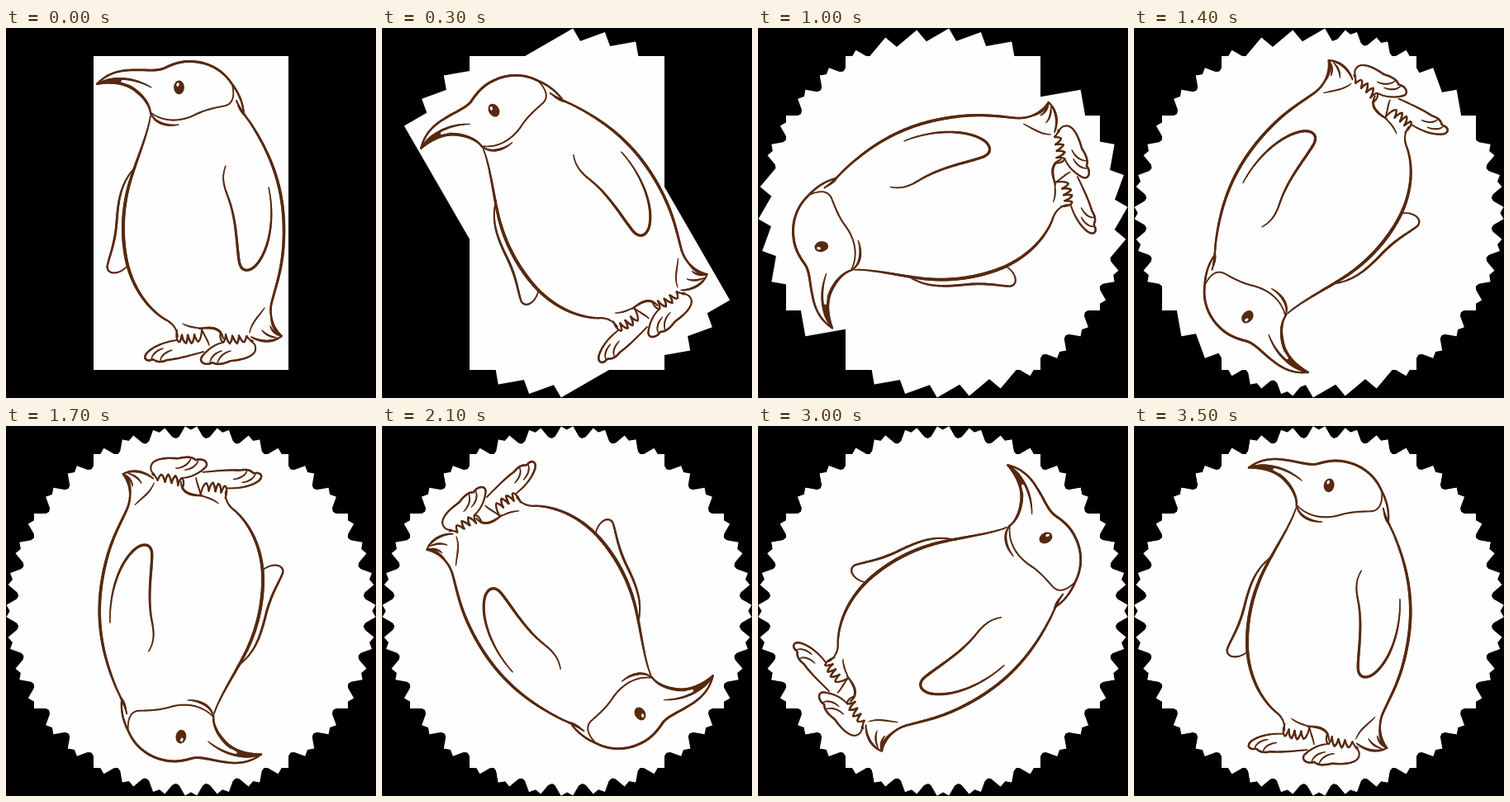
Write an HTML page with a canvas that moves like this. It is 448 px wide and 448 px high and loops after 3.6 s.

```html
<!DOCTYPE html>
<html lang="en">
<head>
<meta charset="utf-8">
<title>Turning penguin</title>
<style>
  html, body { margin: 0; width: 100%; height: 100%; overflow: hidden; background: #000; }
  canvas { display: block; }
</style>
</head>
<body>
<canvas width="448" height="448"></canvas>
<script>
const ctx = document.querySelector('canvas').getContext('2d');
const INK = '#57290f', PAPER = '#fefefe';
const STEP = 100, STEPS = 36, TURN = -Math.PI * 2 / STEPS;

// Each brush stroke: path, width at the ends, width in the middle
const strokes = [
  // beak, head and face
  ['M110 68C120 57 134 51 152 51C168 50 180 53 191 49C203 43 213 40 224 40.500C247 41 264 53 273 67C283 80 287 92 288 104', 2.2, 3],
  ['M110 68C130 64 146 67 157 76C167 84 174 92 175 104', 2, 3.4],
  ['M110 67C132 58 155 60 176 72', 1.3, 2.8],
  ['M274 69C277 82 275 91 266 94C251 97 241 99 229 105C211 114 191 114 176 103', 1.6, 2],
  ['M175 101C177 113 192 120 209 117', 1.2, 3],
  // body
  ['M175 106C172 127 160 155 152 180C142 210 139 244 145 277C151 311 170 339 193 353C203 358 207 365 208 374', 1.7, 4],
  ['M279 88C283 98 289 105 296 115C320 152 336.500 192 336.500 245C336.500 285 329 305 322 331C318 346 322 362 334 373', 2, 3.6],
  ['M281 93C284 99 287 104 290 106', 1.8, 3.2],
  // flippers
  ['M157 168C140 186 136 205 134 235C132 262 125 276 122.500 289C123 300 138 298 146 289', 1.6, 2.9],
  ['M266 167C261 180 263 190 269 205C279 232 279 260 282 281C284 297 295 295 302 288C319 270 326 230 318 193', 1.5, 3.2],
  // tail
  ['M334 373C324 381 309 381 297 374', 1.8, 3],
  ['M313 339C306 349 297 357 295 369', 1.2, 2],
  ['M320 361C322 367 327 371 333 373', 1.4, 2.6],
  ['M310 366C314 371 320 374 328 375', 1.2, 2.4],
  // belly and feathered legs
  ['M214 358C221 362 229 363 237 363.500', 1.2, 2],
  ['M234 364C248 362 260 362 263 376', 1.8, 3],
  ['M207 366Q205 377 210 381Q212 377 213 371Q214 379 218 382Q220 377 220 371Q222 379 225 382Q228 377 228 371Q230 378 233 380Q237 375 237 364', 2, 2.4],
  ['M237 364C239 371 244 377 246 384', 1.5, 2],
  ['M260 368Q258 377 263 381Q266 377 266 371Q268 380 271 382Q274 378 274 372Q277 380 280 382Q282 378 282 372Q285 379 288 381Q291 377 291 372Q294 378 299 379', 2, 2.4],
  // feet
  ['M207 378C191 380 178 386 171 393C164 401 172 405 178 401C183 405 188 405 195 402C207 401 225 396 239 392', 1.8, 2.5],
  ['M176 401C177 395 183 390 190 388', 1.3, 2],
  ['M187 403C187 397 194 392 201 390', 1.3, 2],
  ['M262 381C251 383 240 393 236 400C235 408 246 408 250 405C256 409 265 406 272 403C286 402 300 398 302 390C303 384 300 381 296 379', 1.8, 2.5],
  ['M247 405C248 398 254 393 261 391', 1.3, 2],
  ['M256 406C258 398 264 393 272 391', 1.3, 2]
];

const fills = [
  'M110 69C118 60 132 59 146 61C139 63 136 65 144 68C130 65 120 66 110 69Z',
  'M146 67C162 74 174 88 176 102C168 88 160 77 146 67Z',
  'M322 338C318 350 323 364 334 374C325 372 316 356 322 338Z'
].map(d => new Path2D(d));

// Sample a path into points that carry the brush width
function sample([d, thin, thick]) {
  const path = document.createElementNS('http://www.w3.org/2000/svg', 'path');
  path.setAttribute('d', d);
  const length = path.getTotalLength(), n = Math.ceil(length / 2.5);
  return Array.from({ length: n + 1 }, (_, i) => {
    const { x, y } = path.getPointAtLength(length * i / n);
    return { x, y, w: thin + (thick - thin) * Math.sin(Math.PI * i / n) };
  });
}
const brushed = strokes.map(sample);

function ellipse(x, y, rx, ry, tilt, color) {
  ctx.fillStyle = color;
  ctx.beginPath();
  ctx.ellipse(x, y, rx, ry, tilt, 0, Math.PI * 2);
  ctx.fill();
}

function penguin() {
  ctx.strokeStyle = ctx.fillStyle = INK;
  ctx.lineCap = 'round';
  for (const points of brushed) {
    for (let i = 1; i < points.length; i++) {
      const a = points[i - 1], b = points[i];
      ctx.lineWidth = (a.w + b.w) / 2;
      ctx.beginPath();
      ctx.moveTo(a.x, a.y);
      ctx.lineTo(b.x, b.y);
      ctx.stroke();
    }
  }
  fills.forEach(shape => ctx.fill(shape));
  ellipse(209.5, 72, 6.4, 8.4, 0, INK);
  ellipse(208, 68.5, 1.6, 2.4, 0.3, PAPER);
}

function turned(step, paint) {
  ctx.save();
  ctx.translate(224, 224);
  ctx.rotate(step * TURN);
  ctx.translate(-224, -224);
  paint();
  ctx.restore();
}

function sheet() {
  ctx.fillStyle = PAPER;
  ctx.fillRect(106, 34, 236, 380);
}

function draw(step) {
  ctx.fillStyle = '#000';
  ctx.fillRect(0, 0, 448, 448);
  // Earlier sheets stay visible beneath the current one
  for (let i = 0; i <= step; i++) turned(i, sheet);
  turned(step, penguin);
}

let shown = -1;
function tick() {
  const step = Math.floor(performance.now() / STEP) % STEPS;
  if (step !== shown) draw(shown = step);
  requestAnimationFrame(tick);
}
tick();
</script>
</body>
</html>
```
